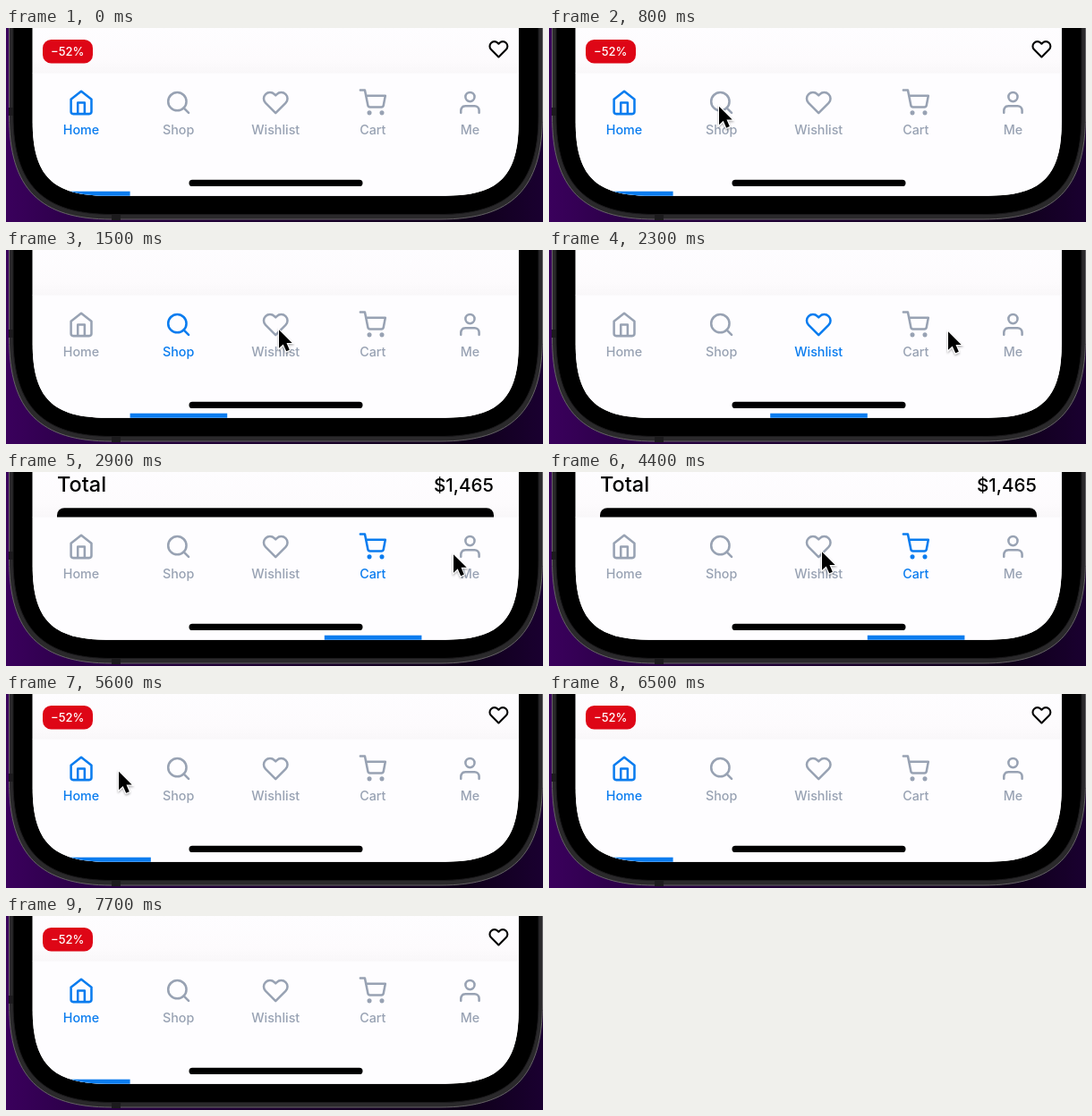
Write an HTML page that moves like this. It is 600 px wide and 217 px high and loops after 7.8 s.

```html
<!DOCTYPE html>
<html lang="en">
<head>
<meta charset="utf-8">
<title>Tab bar</title>
<style>
  html, body { margin: 0; width: 100%; height: 100%; overflow: hidden; background: #1a0030; }
  svg { display: block; width: 100vw; height: 100vh; font-family: Inter, "Open Sans", sans-serif; font-weight: 500; }
  .icon { fill: none; stroke: currentColor; stroke-width: 2; stroke-linecap: round; stroke-linejoin: round; }
  .tab { color: #98a2b3; }
  .tab.on { color: #0a7cef; }
  .tab text { fill: currentColor; font-size: 14.3px; text-anchor: middle; }
</style>
</head>
<body>
<svg viewBox="0 0 600 217">
  <defs>
    <linearGradient id="wall">
      <stop offset="0" stop-color="#3a005c"/>
      <stop offset=".15" stop-color="#2a0046"/>
      <stop offset=".85" stop-color="#0e0018"/>
      <stop offset="1" stop-color="#1a0030"/>
    </linearGradient>
    <linearGradient id="shade" x2="0" y2="1">
      <stop offset="0" stop-color="#fefdff"/>
      <stop offset=".7" stop-color="#fdfbfd"/>
      <stop offset="1" stop-color="#f9f7f9"/>
    </linearGradient>
    <clipPath id="screen">
      <path d="M29.7 0V105C29.7 165 52 187.7 112 187.7H491C551 187.7 572.8 165 572.8 105V0Z"/>
    </clipPath>
    <filter id="soft" x="-50%" y="-50%" width="200%" height="200%">
      <feDropShadow dx="0" dy="1.5" stdDeviation="1.2" flood-opacity=".35"/>
    </filter>
    <path id="heart" d="M20.84 4.61a5.5 5.5 0 0 0-7.78 0L12 5.67l-1.06-1.06a5.5 5.5 0 0 0-7.78 7.78L12 21.23l8.84-8.84a5.5 5.5 0 0 0 0-7.78z"/>
  </defs>

  <rect width="600" height="217" fill="url(#wall)"/>
  <path d="M3.5-9V98C3.5 180 38 214 118 214H485C565 214 599.5 180 599.5 98V-9Z" fill="#2a292b" stroke="#666366"/>
  <path d="M3 89h6v9H3zM118 207h10v8h-10z" fill="#1c1b1d"/>
  <path d="M8-9V98C8 176 42 208.5 118 208.5H485C561 208.5 595 176 595 98V-9Z" stroke="#1b1a1c"/>

  <g clip-path="url(#screen)">
    <rect width="600" height="217" fill="#fefdff"/>
    <rect width="600" height="51" fill="url(#shade)"/>
    <g id="homePage">
      <rect x="41" y="13" width="56" height="26.5" rx="9.5" fill="#de0616"/>
      <text x="68.7" y="31" fill="#fff" font-size="13" text-anchor="middle">−52%</text>
      <use href="#heart" class="icon" transform="translate(539 12.3) scale(.95)" style="stroke-width:2.2"/>
    </g>
    <g id="cartPage">
      <text x="57" y="21.5" font-size="23.5">Total</text>
      <text x="545" y="21.5" font-size="20.6" text-anchor="end">$1,465</text>
      <rect x="57" y="40.2" width="488" height="40" rx="8"/>
    </g>
    <rect y="50.5" width="600" height="170" fill="#fefdff"/>
    <g id="tabs"></g>
    <rect x="204.5" y="169.8" width="194" height="7.2" rx="3.6"/>
    <rect id="bar" y="182.7" width="108.6" height="8" fill="#0a7cef"/>
  </g>

  <path id="cursor" d="M0 0V20.5L4.7 16.1 8.2 24 11.8 22.4 8.5 14.7H14.7Z" stroke="#fff" stroke-width="2" paint-order="stroke" filter="url(#soft)"/>
</svg>
<script>
const LOOP = 7800, LEFT = 30, STEP = 108.6, SLIDE = 300, REST = 100, TRAVEL = 250;
const $ = id => document.getElementById(id);

const tabs = [
  { name: 'Home', stop: 126, icon: '<path d="M3 9l9-7 9 7v11a2 2 0 0 1-2 2H5a2 2 0 0 1-2-2zM9 22V12h6v10"/>' },
  { name: 'Shop', stop: 190, icon: '<circle cx="11" cy="11" r="8"/><path d="M21 21l-4.35-4.35"/>' },
  { name: 'Wishlist', stop: 305, icon: '<use href="#heart"/>' },
  { name: 'Cart', stop: 446, icon: '<circle cx="9" cy="21" r="1"/><circle cx="20" cy="21" r="1"/><path d="M1 1h4l2.68 13.39a2 2 0 0 0 2 1.61h9.72a2 2 0 0 0 2-1.61L23 6H6"/>' },
  { name: 'Me', stop: 500, icon: '<path d="M20 21v-2a4 4 0 0 0-4-4H8a4 4 0 0 0-4 4v2"/><circle cx="12" cy="7" r="4"/>' }
];

$('tabs').innerHTML = tabs.map(({ name, icon }, i) => {
  const x = LEFT + STEP * (i + .5);
  return `<g class="tab"><g class="icon" transform="translate(${x - 15.5} 68.2) scale(1.27)">${icon}</g>
    <text x="${x - .3}" y="118.7">${name}</text></g>`;
}).join('');

const mix = (a, b, k) => a + (b - a) * k;
const clamp = k => Math.min(1, Math.max(0, k));
const smooth = k => k * k * (3 - 2 * k);
const show = (id, on) => $(id).setAttribute('visibility', on ? 'visible' : 'hidden');

// Eight clicks walk from Home to Me, then back at a brisker pace.
const LAST = 8;
const tabOf = n => 4 - Math.abs(4 - n);
const clickTime = n => n < 1 ? 300 : n < 5 ? 900 + 755 * (n - 1) : 4050 + 485 * (n - 5);

// Where the pointer clicks; it starts and ends below the stage.
function stopAt(n) {
  if (n < 1 || n > LAST) return [150, 225];
  const x = tabs[tabOf(n)].stop;
  return [x, 85 + x / 70];
}

function draw(now) {
  const t = now % LOOP;
  let n = 0;
  while (n < LAST && t >= clickTime(n + 1)) n++;
  const age = t - clickTime(n), tab = tabOf(n);

  const slide = 1 - (1 - clamp(age / SLIDE)) ** 4;
  $('bar').setAttribute('x', LEFT + STEP * mix(tabOf(Math.max(0, n - 1)), tab, slide));
  [...$('tabs').children].forEach((g, i) => g.classList.toggle('on', i === tab));
  show('homePage', tab === 0);
  show('cartPage', tab === 3);

  const move = smooth(clamp((age - REST) / TRAVEL)), next = stopAt(n + 1);
  $('cursor').setAttribute('transform', `translate(${stopAt(n).map((v, i) => mix(v, next[i], move))})`);
  requestAnimationFrame(draw);
}
requestAnimationFrame(draw);
</script>
</body>
</html>
```
